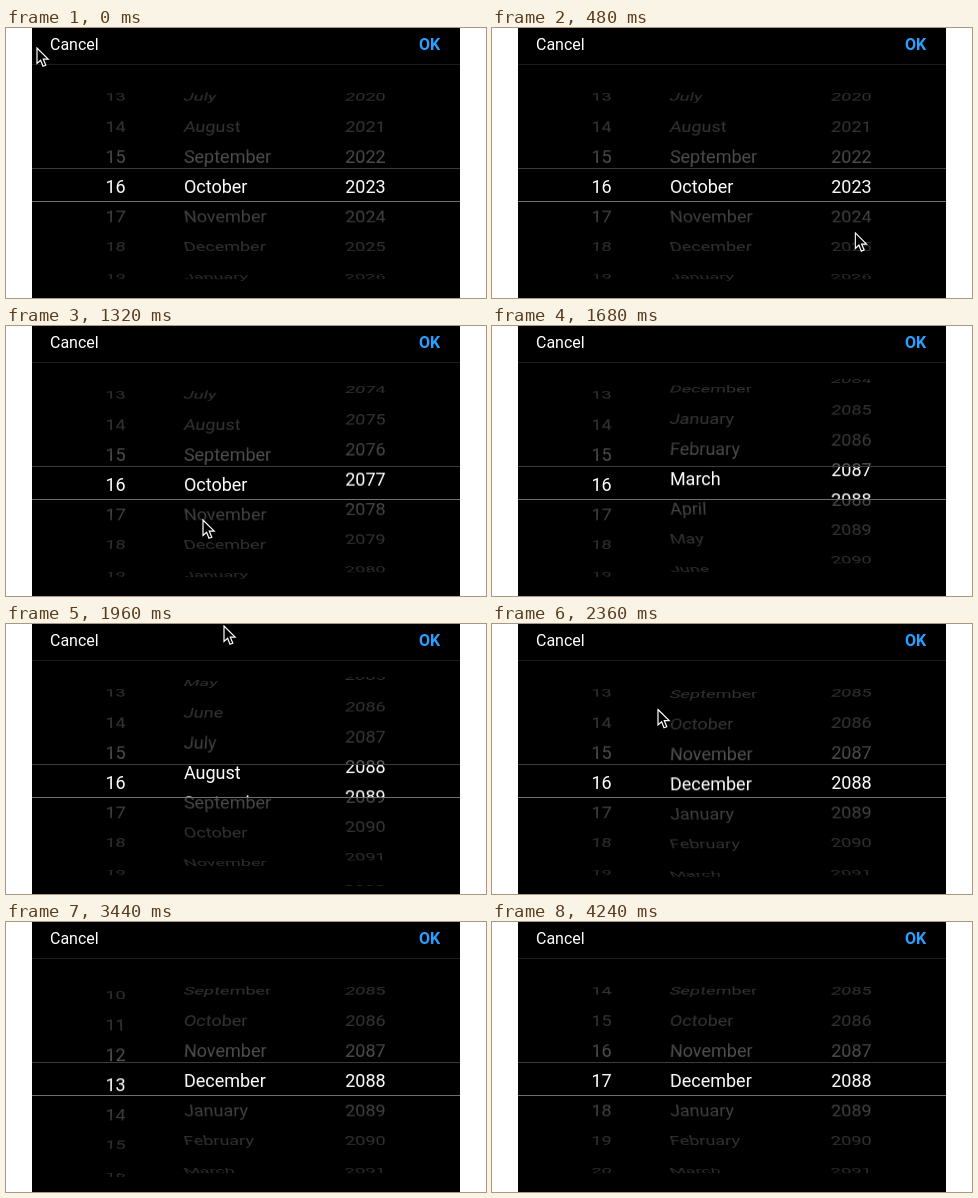
Animation of 480 by 270 pixels, one loop 4.56 s. Source, as an HTML page:

```html
<!DOCTYPE html>
<html lang="en">
<head>
<meta charset="utf-8">
<title>Date picker</title>
<style>
  html, body { margin: 0; width: 100%; height: 100%; overflow: hidden; background: #fff; }
  #stage { position: relative; width: 480px; height: 270px; overflow: hidden; font: 18px/30px Roboto, sans-serif; color: #fff; }
  #stage div, #stage span, #cursor { position: absolute; }
  .panel { left: 26px; width: 428px; }
  #back { top: 0; height: 270px; background: #000; }
  .label { top: 7px; font-size: 16px; line-height: 20px; }
  #ok { left: 413px; font-weight: 700; color: #2a9fff; }
  #wheels { top: 53px; height: 209px; overflow: hidden; }
  #wheels div { top: 0; width: calc(100% / 3); height: 100%; }
  #wheels span { top: 91px; left: 0; width: 100%; box-sizing: border-box; white-space: nowrap; }
  .line { height: 1px; }
  #above { top: 53px; height: 87px; background: linear-gradient(rgba(0, 0, 0, .81), rgba(0, 0, 0, .79) 70%, rgba(0, 0, 0, .64)); }
  #below { top: 174px; height: 88px; background: linear-gradient(rgba(0, 0, 0, .7), rgba(0, 0, 0, .8) 35%, rgba(0, 0, 0, .83)); }
  #cursor { left: 0; top: 0; }
</style>
</head>
<body>
<div id="stage">
  <div id="back" class="panel"></div>
  <span class="label" style="left:44px">Cancel</span>
  <span class="label" id="ok">OK</span>
  <div class="panel line" style="top:36px;background:#1c1c1c"></div>
  <div id="wheels" class="panel"></div>
  <div id="above" class="panel"></div>
  <div id="below" class="panel"></div>
  <div class="panel line" style="top:140px;background:#3c3c3c"></div>
  <div class="panel line" style="top:173px;background:#707070"></div>
  <svg id="cursor" width="14" height="21">
    <path d="M1 1V16.5L4.6 13.2 7 19.3 9.8 18.2 7.3 12.2H12.2Z" fill="#000" stroke="#fff" stroke-width="1.2"/>
  </svg>
</div>
<script>
const LOOP = 4560, STEP = 40, ROW = 30, TILT = 20, LEAN = 0.3;
const MONTHS = ['January', 'February', 'March', 'April', 'May', 'June', 'July',
  'August', 'September', 'October', 'November', 'December'];

// A flick carries a wheel a little past its goal, then it snaps back.
const day = { indent: 73.5, text: i => (i - 1) % 31 + 1,
  from: 16, to: 48, over: 0.4, start: 2840, time: 1064 };
const month = { indent: 8.9, text: i => MONTHS[i % 12],
  from: 9, to: 23, over: 0.35, start: 1400, time: 1277 };
const year = { indent: 28.2, text: i => i,
  from: 2023, to: 2088, over: 0.53, start: 600, time: 1360 };
const wheels = [day, month, year];

// The pointer enters, rests on its goal and shoots up when the flick starts.
const visits = [
  { enter: 0, start: year.start, a: [30, 19], b: [368, 207] },
  { enter: 960, start: month.start, a: [300, -21], b: [196, 193] },
  { enter: 1960, start: day.start, a: [217, 1], b: [113, 168] },
  { enter: 3880, start: 4160, a: [200, 60], b: [421, 10] }
];

const clamp = u => Math.min(1, Math.max(0, u));
const smooth = u => u * u * (3 - 2 * u);
const spin = u => 1 - (1 - u ** 1.32) ** 3.1;

function position({ from, to, over, start, time }, t) {
  const run = spin(clamp((t - start) / time));
  const back = smooth(clamp((t - start - time - 130) / 200));
  return from + (to + over - from) * run - over * back;
}

function pointerAt(t) {
  const { enter, start, a, b } = visits.findLast(v => v.enter <= t);
  const u = smooth(clamp((t - enter) / (start - 80 - enter)));
  const [x, y] = a.map((v, i) => v + (b[i] - v) * u);
  return [x, y - Math.max(0, t - start)];
}

const box = document.getElementById('wheels');
wheels.forEach((wheel, n) => {
  const column = box.appendChild(document.createElement('div'));
  column.style.left = n * 100 / 3 + '%';
  wheel.rows = Array.from({ length: 9 }, () => {
    const row = column.appendChild(document.createElement('span'));
    row.style.paddingLeft = wheel.indent + 'px';
    return row;
  });
});
const cursor = document.getElementById('cursor');

function draw(t) {
  for (const wheel of wheels) {
    const pos = position(wheel, t), mid = Math.round(pos);
    wheel.rows.forEach((row, n) => {
      const index = mid + n - 4, offset = index - pos;
      row.textContent = wheel.text(index);
      row.style.transform =
        `translateY(${offset * ROW}px) perspective(220px) rotateX(${-(offset + LEAN) * TILT}deg)`;
    });
  }
  const [x, y] = pointerAt(t);
  cursor.style.transform = `translate(${x}px, ${y}px)`;
}

function tick() {
  draw(Math.floor(performance.now() % LOOP / STEP) * STEP);
  requestAnimationFrame(tick);
}
tick();
</script>
</body>
</html>
```
